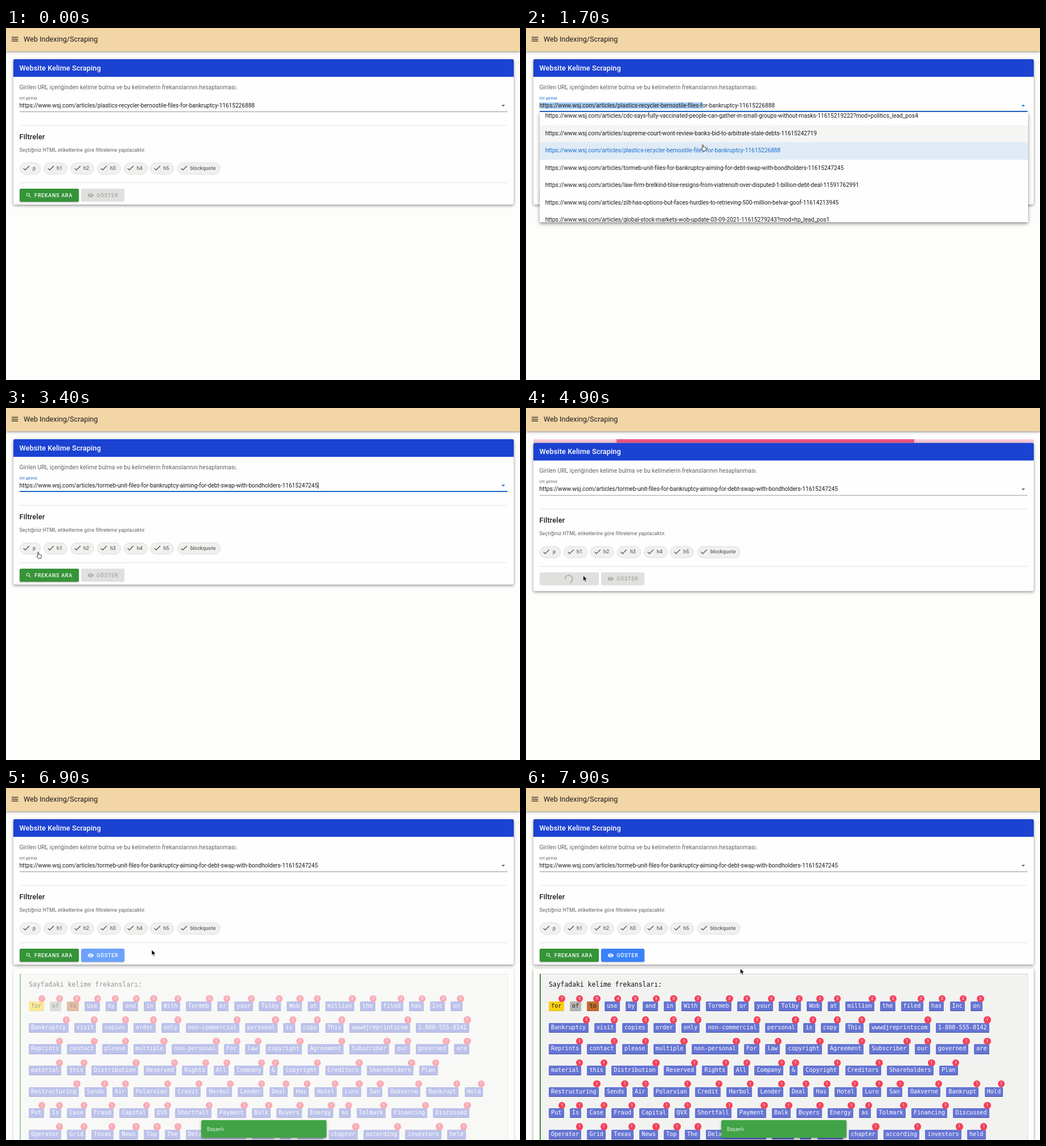
Write an HTML page that moves like this. It is 903 px wide and 620 px high and loops after 8 s.

```html
<!DOCTYPE html>
<html lang="tr">
<head>
<meta charset="utf-8">
<title>Web Indexing/Scraping</title>
<style>
html, body { margin: 0; width: 100%; height: 100%; overflow: hidden; background: #fdfdfc; }
#stage { position: relative; width: 903px; height: 620px; overflow: hidden; background: #fdfdfc; font-family: Roboto, sans-serif; color: #1c1c1c; }
#stage div, #stage svg { position: absolute; box-sizing: border-box; }
.text { white-space: pre; line-height: 20px; height: 20px; }
.layer { left: 0; top: 0; width: 903px; height: 620px; }
#bar { left: 0; top: 0; width: 903px; height: 40.5px; background: #f3d6a6; box-shadow: 0 1px 3px rgba(0,0,0,.38), 0 2px 6px rgba(0,0,0,.12); }
.card { left: 13px; width: 878.5px; background: #fefefe; border-radius: 2.5px; box-shadow: 0 1.5px 4px rgba(0,0,0,.34), 0 2px 7px rgba(0,0,0,.14); }
#head { left: 13px; top: 55.3px; width: 878.5px; height: 30.5px; background: #1b42d2; border-radius: 2.5px 2.5px 0 0; }
#load { left: 13px; top: 55.3px; width: 878.5px; height: 9px; overflow: hidden; background: #f8c9d6; border-radius: 2.5px 2.5px 0 0; }
#load div { top: 0; height: 9px; background: #ee5680; }
.rule { left: 23.5px; width: 857.5px; height: 1px; background: #e2e2e0; }
.chip { top: 236.5px; height: 21px; border-radius: 11px; background: #f0f0ee; border: .7px solid #dededa; }
.btn { top: 283.3px; height: 23px; border-radius: 2.5px; }
.raised { box-shadow: 0 1px 2px rgba(0,0,0,.35); }
#menu { left: 23.5px; top: 148px; width: 858px; height: 193.5px; overflow: hidden; background: #fefefe; }
#shade { left: 23.5px; top: 148px; width: 858px; height: 193.5px; box-shadow: 0 3px 5px rgba(0,0,0,.28), 0 2px 9px rgba(0,0,0,.2); border-radius: 0 0 2.5px 2.5px; }
.item { left: 0; width: 858px; height: 30.5px; }
#box { left: 23.5px; top: 326.5px; width: 858px; height: 310px; background: #f2f3f1; border: .8px solid #d3dccb; border-left: 2px solid #388e3c; }
.word { height: 17.2px; line-height: 15.5px; padding-left: 4.1px; white-space: pre; font: 10.17px/15.5px "DejaVu Sans Mono", monospace; color: #fff; background: #6675d3; border-bottom: 1.5px solid #3f4da8; border-radius: 1.5px; }
.badge { width: 12.4px; height: 12.4px; border-radius: 50%; background: #f5425a; color: #fff; font: 7.6px/12.4px Roboto, sans-serif; text-align: center; }
#snack { left: 343px; top: 585px; width: 219.5px; height: 30.8px; background: #40a446; border-radius: 2.5px; box-shadow: 0 2px 4px rgba(0,0,0,.35); }
</style>
</head>
<body>
<div id="stage"></div>
<script>
const stage = document.getElementById('stage');
const site = 'https://www.wsj.com/articles/';
const oldUrl = site + 'plastics-recycler-bernostile-files-for-bankruptcy-11615226888';
const newUrl = site + 'tormeb-unit-files-for-bankruptcy-aiming-for-debt-swap-with-bondholders-11615247245';
const items = [
  site + 'cdc-says-fully-vaccinated-people-can-gather-in-small-groups-without-masks-11615219222?mod=politics_lead_pos4',
  site + 'supreme-court-wont-review-banks-bid-to-arbitrate-stale-debts-11615242719',
  oldUrl,
  newUrl,
  site + 'law-firm-brelkind-tilse-resigns-from-viatrenolt-over-disputed-1-billion-debt-deal-11591762991',
  site + 'zilt-has-options-but-faces-hurdles-to-retrieving-500-million-belvar-goof-11614213945',
  site + 'global-stock-markets-wob-update-03-09-2021-11615279243?mod=hp_lead_pos1'
];
const rows = [
  'for of to use by and in With Tormeb or your Tolby Wob at million the filed has Inc on',
  'Bankruptcy visit copies order only non-commercial personal is copy This wwwdjreprintscom 1-800-555-0142',
  'Reprints contact please multiple non-personal For law copyright Agreement Subscriber our governed are',
  'material this Distribution Reserved Rights All Company & Copyright Creditors Shareholders Plan',
  'Restructuring Sends Air Polarvian Credit Harbol Lender Deal Has Hotel Luro San Oakverne Bankrupt Hold',
  'Put Is Case Fraud Capital QVX Shortfall Payment Balk Buyers Energy as Tolmark Financing Discussed',
  'Operator Grid Texas News Top The Delawareregistry court in filing chapter according investors held'
];
const icons = {
  menu: 'M3 6h18v2H3zM3 11h18v2H3zM3 16h18v2H3z',
  check: 'M21 7L9 19l-5.5-5.5 1.41-1.41L9 16.17 19.59 5.59z',
  down: 'M7 10l5 5 5-5z',
  search: 'M9.5 3A6.5 6.5 0 0 1 16 9.5c0 1.61-.59 3.09-1.56 4.23l.27.27h.79l5 5-1.5 1.5-5-5v-.79l-.27-.27A6.5 6.5 0 1 1 9.5 3m0 2a4.5 4.5 0 1 0 0 9 4.5 4.5 0 0 0 0-9',
  eye: 'M12 9a3 3 0 1 0 0 6 3 3 0 0 0 0-6m0 8a5 5 0 1 1 0-10 5 5 0 0 1 0 10m0-12.5C7 4.5 2.73 7.61 1 12c1.73 4.39 6 7.5 11 7.5s9.27-3.11 11-7.5c-1.73-4.39-6-7.5-11-7.5'
};

function add(parent, cls, style) {
  const el = document.createElement('div');
  if (cls) el.className = cls;
  Object.assign(el.style, style);
  parent.append(el);
  return el;
}
function named(parent, id, cls) {
  const el = add(parent, cls);
  el.id = id;
  return el;
}
// y is the middle of the line
function text(parent, x, y, str, size, style) {
  const el = add(parent, 'text', { left: x + 'px', top: y - 10 + 'px', fontSize: size + 'px', ...style });
  el.textContent = str;
  return el;
}
function svg(parent, x, y, w, h, box, body) {
  const el = document.createElementNS('http://www.w3.org/2000/svg', 'svg');
  el.setAttribute('viewBox', box);
  Object.assign(el.style, { left: x + 'px', top: y + 'px', width: w + 'px', height: h + 'px', overflow: 'visible' });
  el.innerHTML = body;
  parent.append(el);
  return el;
}
function icon(parent, name, cx, cy, size, color) {
  const el = svg(parent, cx - size / 2, cy - size / 2, size, size, '0 0 24 24', `<path d="${icons[name]}" fill="currentColor"/>`);
  el.style.color = color;
  return el;
}

// Result panel
const panel = add(stage, 'layer');
add(panel, 'card', { top: '317.5px', height: '320px' });
named(panel, 'box');
const mono = '"DejaVu Sans Mono", monospace';
text(panel, 40, 345.5, 'Sayfadaki kelime frekansları:', 11.4, { fontFamily: mono, color: '#111' });
const medals = ['#f8d013', '#b4b4b2', '#c46a2b'];
let n = 0;
rows.forEach((row, r) => {
  let x = 40;
  const y = 376.2 + r * 37.6;
  for (const w of row.split(' ')) {
    const width = w.length * 6.12 + 8.3;
    const el = add(panel, 'word', { left: x + 'px', top: y + 'px', width: width + 'px' });
    el.textContent = w;
    if (n < 3) Object.assign(el.style, { background: medals[n], color: '#222', borderColor: ['#dcb400', '#98989a', '#a85518'][n] });
    const badge = add(panel, 'badge', { left: x + width - 9.6 + 'px', top: y - 11.5 + 'px' });
    badge.textContent = [7, 5, 5, 4][n] || (n < 11 ? 3 : n < 30 ? 2 : 1);
    x += w.length * 6.12 + 18.4;
    n++;
  }
});

// Form card
const load = named(stage, 'load');
const strip = add(load);
const form = add(stage, 'layer');
const card = add(form, 'card', { top: '55.3px' });
named(form, 'head');
text(form, 23.5, 71, 'Website Kelime Scraping', 12.68, { color: '#fff', fontWeight: 500, letterSpacing: '.1px' });
text(form, 23.5, 105, 'Girilen URL içeriğinden kelime bulma ve bu kelimelerin frekanslarının hesaplanması.', 10.14, { color: '#616161', letterSpacing: '.108px' });
const label = text(form, 23.5, 123.7, 'Url giriniz', 7.6);
const field = text(form, 23.5, 136.8, '', 10.14);
const picked = document.createElement('span');
picked.style.background = '#a9cdf3';
const rest = document.createElement('span');
field.append(picked, rest);
const caret = document.createElement('span');
Object.assign(caret.style, { borderLeft: '1px solid #333', marginLeft: '.3px' });
field.append(caret);
const arrow = icon(form, 'down', 873.5, 137, 15.2);
const line = add(form, '', { left: '23.5px', width: '857.5px' });
add(form, 'rule', { top: '171px' });
text(form, 23.5, 192.3, 'Filtreler', 12.68, { fontWeight: 500, letterSpacing: '.16px' });
text(form, 23.5, 214.8, 'Seçtiğiniz HTML etiketlerine göre filtreleme yapılacaktır.', 8.88, { color: '#616161', letterSpacing: '.05px' });
[['p', 23.7, 37], ['h1', 65.8, 42], ['h2', 112.8, 42], ['h3', 159.7, 42], ['h4', 206.5, 42], ['h5', 253.4, 42], ['blockquote', 300.5, 76.5]].forEach(([tag, x, w]) => {
  add(form, 'chip', { left: x + 'px', width: w + 'px' });
  icon(form, 'check', x + 12.3, 247, 15.2, '#4a4a4a');
  text(form, x + 23.2, 247.2, tag, 8.88, { color: '#666', fontWeight: 500, letterSpacing: '.05px' });
});
add(form, 'rule', { top: '272px' });

const caps = { fontWeight: 500, letterSpacing: '.79px' };
const search = add(form, 'btn', { left: '23.5px', width: '104px' });
const searchFace = add(form, 'layer');
icon(searchFace, 'search', 39.5, 295, 11.4, '#fff');
text(searchFace, 50, 295.2, 'FREKANS ARA', 8.88, { ...caps, color: '#fff' });
const spinner = svg(form, 67.2, 286.9, 16, 16, '0 0 48 48', '<circle cx="24" cy="24" r="20" fill="none" stroke="#a4a4a4" stroke-width="4.5"/>');
const arc = spinner.firstChild;
const show = add(form, 'btn', { left: '132.3px', width: '76px' });
const showIcon = icon(form, 'eye', 148.6, 295, 11.4);
const showText = text(form, 159.2, 295.2, 'GÖSTER', 8.88, caps);

// Toolbar
named(stage, 'bar');
icon(stage, 'menu', 16, 20, 15.2, '#1c1c1c');
text(stage, 31, 20.3, 'Web Indexing/Scraping', 12.68);

// Suggestion list
const drop = add(stage, 'layer');
named(drop, 'shade');
const menu = named(drop, 'menu');
const entries = items.map((url, i) => {
  const el = add(menu, 'item', { top: -8 + i * 30.5 + 'px' });
  text(el, 10.2, 15.3, url, 10.14, { color: i === 2 ? '#1a6fd0' : '#1c1c1c' });
  return el;
});

const snack = named(stage, 'snack');
text(snack, 10, 15.5, 'Başarılı', 8.88, { color: '#e2f2e2' });

// Pointer
const pointer = svg(stage, 0, 0, 8, 12, '0 0 8 12',
  '<path d="M0 0V9.6L2.2 7.6 3.8 11.2 5.3 10.6 3.8 7.1H6.8Z" fill="#000" stroke="#fff" stroke-width=".6"/>' +
  '<path d="M-.8 .9C-.8-.3 .9-.3 1 .9V4.2C1.4 3.4 2.5 3.6 2.6 4.4 3.1 3.8 4.1 4.1 4.2 4.9 4.8 4.5 5.6 4.9 5.6 5.7V8L4.8 11H.3L-2.3 7.6C-3 6.5-1.9 5.8-.8 7Z" fill="#fff" stroke="#222" stroke-width=".9"/>');
const [tip, hand] = pointer.children;
const path = [
  [100, 440, 501], [800, 311, 134], [1300, 311, 136], [1700, 310.5, 205.5], [2200, 296, 242], [2500, 292, 243],
  [3400, 56.5, 254], [4000, 99, 293], [4900, 100.5, 295], [5200, 110, 291], [5900, 483.5, 202], [6500, 172, 292],
  [6700, 172, 292], [6900, 256, 285], [7400, 376.5, 318], [8000, 376.5, 318]
];

const within = (t, a, b) => t >= a && t < b;
const ramp = (t, a, b) => Math.min(1, Math.max(0, (t - a) / (b - a)));
const mix = (a, b, k) => a + (b - a) * k;
const smooth = k => k * k * (3 - 2 * k);
const show_ = (el, on) => { el.style.display = on ? '' : 'none'; };

// CSS "ease" curve
function ease(x) {
  let lo = 0, hi = 1;
  for (let i = 0; i < 20; i++) {
    const s = (lo + hi) / 2;
    const v = .75 * s * (1 - s) + s * s * s;
    if (v < x) lo = s; else hi = s;
  }
  return .3 * lo * (1 - lo) ** 2 + 3 * lo * lo * (1 - lo) + lo ** 3;
}

function drawPointer(t) {
  show_(pointer, t >= 100);
  const i = Math.max(0, path.findLastIndex(p => p[0] <= t));
  const a = path[i], b = path[i + 1] || a;
  const k = a === b ? 0 : smooth(ramp(t, a[0], b[0]));
  pointer.style.transform = `translate(${mix(a[1], b[1], k)}px, ${mix(a[2], b[2], k)}px)`;
  const onLink = within(t, 1400, 2600) || within(t, 3300, 4350) || within(t, 6400, 6800);
  show_(hand, onLink);
  show_(tip, !onLink);
}

function drawLoading(t) {
  const on = within(t, 4350, 5350);
  const age = t - 4350;
  show_(load, on);
  show_(spinner, on);
  show_(searchFace, !on);
  form.style.transform = on ? 'translateY(6.4px)' : '';
  card.style.height = (on ? 261 : 256) + 'px';
  search.style.background = on ? '#e0e0de' : '#359438';
  search.classList.toggle('raised', !on);
  if (!on) return;
  const k = ease(ramp(age, 0, 1320));
  const left = mix(-200, 107, k), right = mix(100, -8, k);
  strip.style.left = left + '%';
  strip.style.width = Math.max(0, 100 - left - right) + '%';
  const turn = age % 1400 / 1400;
  const grow = smooth(ramp(turn, 0, .5)), slide = smooth(ramp(turn, .5, 1));
  arc.setAttribute('stroke-dasharray', `${mix(1, 100, grow)} 200`);
  arc.setAttribute('stroke-dashoffset', -15 * grow - 110 * slide);
  spinner.style.transform = `rotate(${turn * 360}deg)`;
}

function draw(t) {
  const focus = within(t, 900, 4300);
  const open = within(t, 900, 2500);
  label.style.color = focus ? '#1a6fd0' : '#666';
  arrow.style.color = focus ? '#1a6fd0' : '#666';
  arrow.style.transform = open ? 'rotate(180deg)' : '';
  Object.assign(line.style, focus
    ? { top: '146.2px', height: '1.5px', background: '#1f68c8' }
    : { top: '146.7px', height: '1px', background: '#9294a6' });

  const url = t < 2500 ? oldUrl : newUrl;
  const cut = open ? oldUrl.indexOf('or-bankruptcy') : 0;
  picked.textContent = url.slice(0, cut);
  rest.textContent = url.slice(cut);
  show_(caret, within(t, 2500, 4300) && Math.floor((t - 2400) / 500) % 2 === 0);

  drop.style.opacity = ramp(t, 850, 1050) * (1 - ramp(t, 2450, 2700));
  const over = within(t, 1500, 1800) ? 1 : within(t, 1900, 2700) ? 3 : -1;
  entries.forEach((el, i) => {
    el.style.background = i === 2 ? '#e0ebf6' : i === over ? '#f5f5f4' : '';
  });

  drawLoading(t);

  const ready = t >= 5350;
  show.style.background = !ready ? '#e0e0de' : within(t, 6450, 7200) ? '#6ba2fd' : '#3a82fb';
  show.classList.toggle('raised', ready);
  showIcon.style.color = showText.style.color = ready ? '#fff' : '#a5a5a5';

  const pop = ramp(t, 5300, 5500);
  snack.style.opacity = pop;
  snack.style.transform = `scale(${mix(.8, 1, pop)})`;
  panel.style.opacity = ramp(t, 6750, 7100);
  drawPointer(t);
}

function tick() {
  draw(Math.floor(performance.now() % 8000 / 100) * 100);
  requestAnimationFrame(tick);
}
tick();
</script>
</body>
</html>
```
